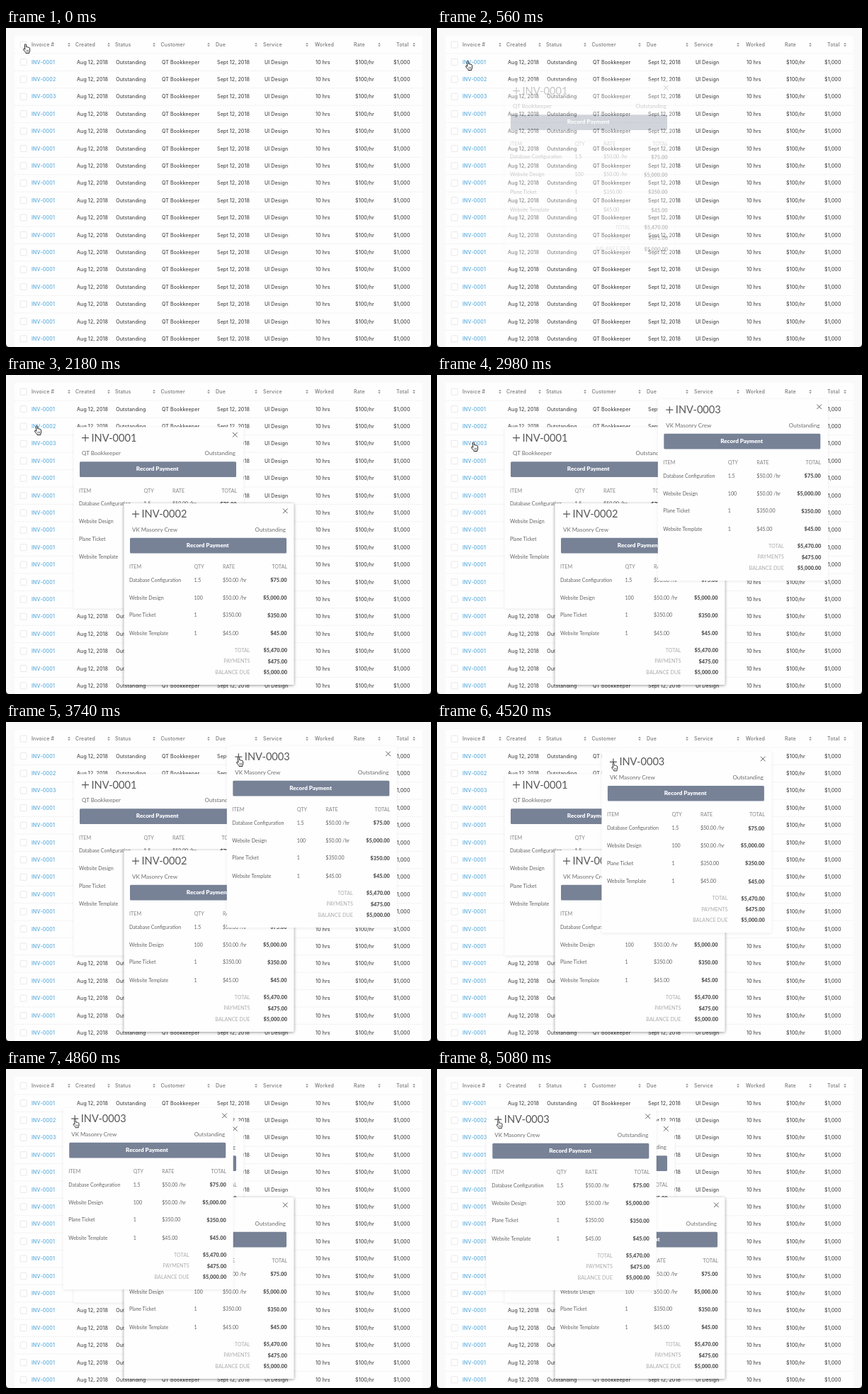
An HTML page that plays this animation: 600x450 px, repeating every 5780 ms.

```html
<!DOCTYPE html>
<html lang="en">
<head>
<meta charset="utf-8">
<title>Invoices</title>
<style>
  html, body { margin: 0; width: 100%; height: 100%; overflow: hidden; background: #222; }
  svg { display: block; width: 600px; height: 450px; }
  text { white-space: pre; }
  .table { font: 500 7px Inter, sans-serif; letter-spacing: .12px; fill: #4a4a4a; }
  .table .head { fill: #757575; letter-spacing: .2px; }
  .table .link { fill: #55aadd; letter-spacing: .2px; }
  .popup { font: 400 7.05px Lato, sans-serif; fill: #626262; }
  .popup .title { font-size: 14.6px; fill: #585858; }
  .popup .party { font-size: 8px; fill: #6c6c6c; }
  .popup .button { font-size: 8.1px; font-weight: 900; fill: #fff; }
  .popup .head { font-size: 7.2px; fill: #858585; }
  .popup .sum { font-size: 7.2px; fill: #acacac; }
  .popup .money { font-size: 7.4px; font-weight: 900; fill: #5a5a5a; }
</style>
</head>
<body>
<svg id="stage" viewBox="0 0 600 450">
  <defs>
    <filter id="blur" x="-10%" y="-10%" width="120%" height="120%">
      <feGaussianBlur stdDeviation="2.2"/>
    </filter>
  </defs>
  <path d="M0 0H600V445Q600 450 595 450H5Q0 450 0 445Z" fill="#f9f9f9"/>
  <rect x="12" y="11" width="576" height="439" fill="#fefefe"/>
  <g id="table" class="table"></g>
  <g id="popups"></g>
  <g id="cursor">
    <path d="M2.3 1.6Q2.5.4 3.5.6Q4.3.8 4.4 1.8L4.8 5Q5.6 4.4 6.3 5.1Q7.2 4.6 7.8 5.4Q9.2 5.1 9.5 6.6L9.7 9.3Q9.7 11.2 8.8 12.2V13.5H4L3.8 12.4Q2.2 11 .7 8.7Q.2 7.5 1.2 7.3Q2 7.3 2.9 8.3Z"
      fill="#fff" stroke="#222" stroke-width="1" stroke-linejoin="round"/>
    <path d="M4.8 8.8V11.6M6.3 8.8V11.6M7.7 8.8V11.6" stroke="#333" stroke-width=".6"/>
  </g>
</svg>
<script>
const LOOP = 5780;
const NS = 'http://www.w3.org/2000/svg';
const byId = id => document.getElementById(id);

function add(parent, tag, attrs, content) {
  const el = document.createElementNS(NS, tag);
  for (const key in attrs) el.setAttribute(key, attrs[key]);
  if (content) el.textContent = content;
  return parent.appendChild(el);
}
const label = (parent, x, y, content, cls = '', anchor = 'start') =>
  add(parent, 'text', { x, y, class: cls, 'text-anchor': anchor }, content);

// Column: heading, heading x, cell text, cell x, sorter x
const columns = [
  ['Invoice #', 36, '', 36, 89],
  ['Created', 98, 'Aug 12, 2018', 100, 145],
  ['Status', 154, 'Outstanding', 155.3, 209],
  ['Customer', 218.5, 'QT Bookkeeper', 220, 286],
  ['Due', 296, 'Sept 12, 2018', 298, 353],
  ['Service', 363, 'UI Design', 365, 425],
  ['Worked', 436, '10 hrs', 437, 0],
  ['Rate', 491, '$100/hr', 493, 527],
  ['Total', 551, '$1,000', 547, 576]
];

function buildTable(g) {
  for (let row = 0; row <= 17; row++) {
    const y = 23.6 + row * 24.4;
    add(g, 'path', { d: `M12 ${y + 12.4}H588`, stroke: '#ebebeb', 'stroke-width': .8, 'stroke-dasharray': '2 1' });
    add(g, 'rect', { x: 20.2, y: y - 4.5, width: 9, height: 9, rx: 1, fill: '#fff', stroke: '#e2e2e2', 'stroke-width': .8 });
    columns.forEach(([head, headX, cell, cellX, sortX], i) => {
      if (row) {
        const number = 'INV-000' + (row <= 3 ? row : 1);
        label(g, cellX, y + 2.6, i ? cell : number, i ? '' : 'link');
        return;
      }
      label(g, headX, y + 2.5, head, 'head');
      if (sortX) add(g, 'path', {
        d: `M${sortX - 1.8} ${y - .9}l1.8 -2 1.8 2zM${sortX - 1.8} ${y + .7}l1.8 2 1.8 -2z`, fill: '#8a8a8a'
      });
    });
  }
}

const items = [
  ['Database Configuration', '1.5', '$50.00 /hr', '$75.00', 182],
  ['Website Design', '100', '$50.00 /hr', '$5,000.00', 206.7],
  ['Plane Ticket', '1', '$350.00', '$350.00', 231.5],
  ['Website Template', '1', '$45.00', '$45.00', 257]
];
const sums = [['TOTAL', '$5,470.00'], ['PAYMENTS', '$475.00'], ['BALANCE DUE', '$5,000.00']];

function buildPopup({ number, party, shadow }) {
  const g = add(byId('popups'), 'g', { class: 'popup' });
  const panel = { x: 95.5, y: 73.5, width: 240, height: 256, rx: 1.5 };
  add(g, 'rect', { ...panel, y: 74.5, fill: '#000', opacity: shadow, filter: 'url(#blur)' });
  add(g, 'rect', { ...panel, fill: '#fefefe' });
  add(g, 'path', { d: 'M107 88.7H117M112 83.7V93.7', stroke: '#585858', 'stroke-width': 1.2 });
  label(g, 120.5, 93.5, number, 'title');
  add(g, 'path', { d: 'M320 81l6.6 6.6m0 -6.6l-6.6 6.6', stroke: '#606060', 'stroke-width': 1 });
  label(g, 107, 113, party, 'party');
  label(g, 324, 113, 'Outstanding', 'party', 'end');
  add(g, 'rect', { x: 104, y: 122.3, width: 221, height: 21.6, rx: 1.5, fill: '#778297' });
  label(g, 213.8, 135, 'Record Payment', 'button', 'middle');
  label(g, 103, 165.7, 'ITEM', 'head');
  label(g, 194.5, 165.7, 'QTY', 'head');
  label(g, 235, 165.7, 'RATE', 'head');
  label(g, 326, 165.7, 'TOTAL', 'head', 'end');
  for (const [name, qty, rate, total, y] of items) {
    label(g, 103, y + 2.4, name);
    label(g, 194.5, y + 2.4, qty);
    label(g, 235, y + 2.4, rate);
    label(g, 325.5, y + 2.9, total, 'money', 'end');
  }
  sums.forEach(([name, amount], i) => {
    const y = 283.6 + i * 15.3;
    label(g, 273.5, y, name, 'sum', 'end');
    label(g, 326, y + .3, amount, 'money', 'end');
  });
  return g;
}

const popups = [
  { number: 'INV-0001', party: 'QT Bookkeeper', x: 0, y: 0, start: 460, shadow: .08 },
  { number: 'INV-0002', party: 'VK Masonry Crew', x: 71, y: 107.5, start: 1480, shadow: .42 },
  { number: 'INV-0003', party: 'VK Masonry Crew', x: 216.3, y: -39.5, start: 2420, shadow: .08 }
];

// Cursor move: start, end, destination x, destination y
const moves = [
  [200, 300, 40, 46],
  [1220, 1340, 40, 71],
  [2190, 2300, 48, 94],
  [3300, 3740, 325, 49]
];
const drag = { start: 4420, end: 4980, dx: -242, dy: 22 };

const progress = (t, start, end) => Math.min(1, Math.max(0, (t - start) / (end - start)));
const easeOut = p => 1 - (1 - p) ** 2;

function render(t) {
  const dragged = easeOut(progress(t, drag.start, drag.end));
  const dx = drag.dx * dragged;
  const dy = drag.dy * dragged;

  popups.forEach((p, i) => {
    const moving = i === popups.length - 1;
    const x = p.x + (moving ? dx : 0);
    const y = p.y + (moving ? dy : 0);
    p.el.setAttribute('transform', `translate(${x} ${y})`);
    p.el.setAttribute('opacity', easeOut(progress(t, p.start, p.start + 560)));
  });

  let x = 24, y = 22;
  for (const [start, end, toX, toY] of moves) {
    const k = easeOut(progress(t, start, end));
    x += (toX - x) * k;
    y += (toY - y) * k;
  }
  const scale = 1 - .12 * progress(t, 3910, 3980);
  byId('cursor').setAttribute('transform',
    `translate(${x + dx + 5 * (1 - scale)} ${y + dy + 7 * (1 - scale)}) scale(${scale})`);
}

buildTable(byId('table'));
for (const p of popups) p.el = buildPopup(p);

const began = performance.now();
function tick() {
  render((performance.now() - began) % LOOP);
  requestAnimationFrame(tick);
}
render(0);
requestAnimationFrame(tick);
</script>
</body>
</html>
```
